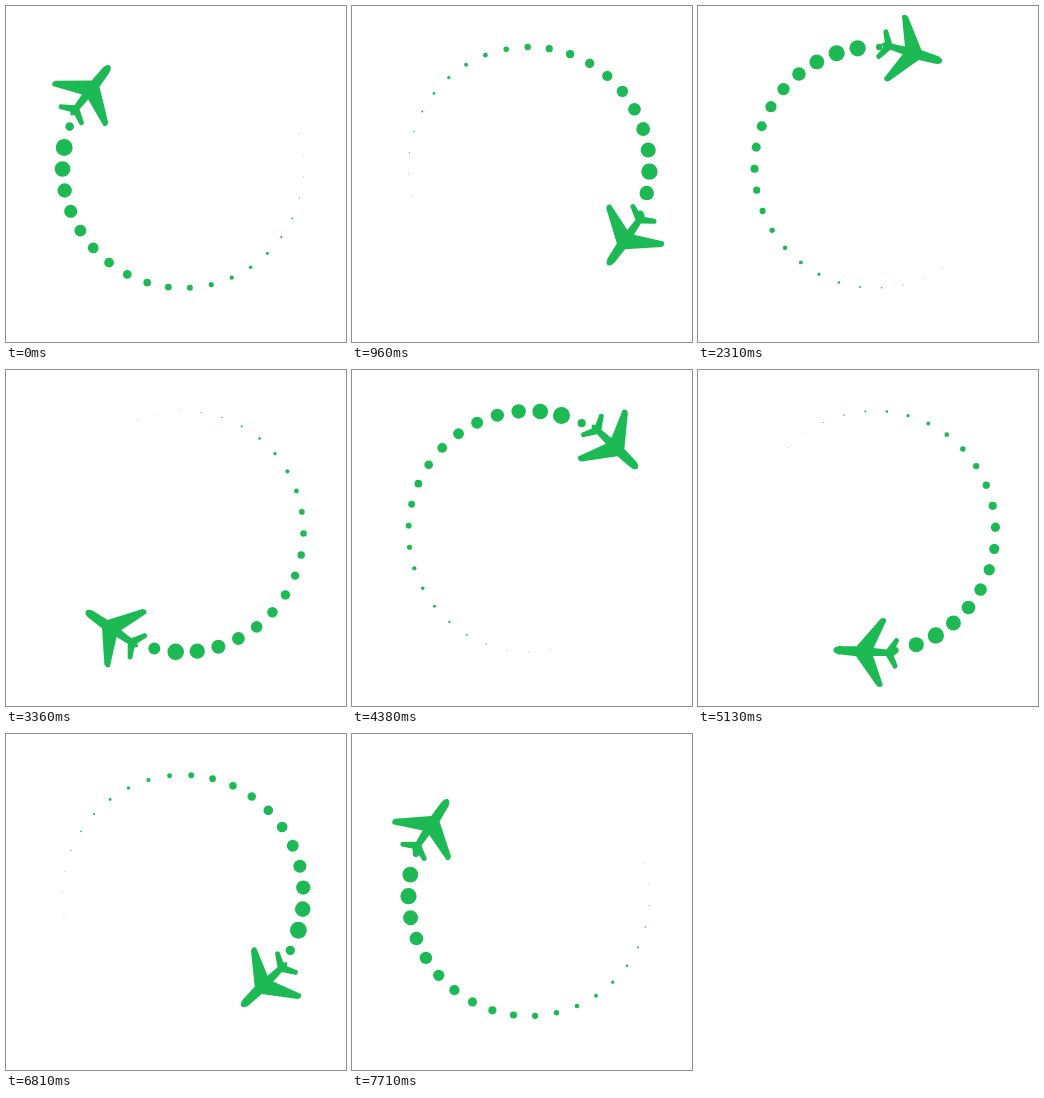
An HTML page that plays this animation: 340x336 px, repeating every 7.74 s.

```html
<!DOCTYPE html>
<html lang="en">
<head>
<meta charset="utf-8">
<title>Circling plane</title>
<style>
  html, body { margin: 0; width: 100%; height: 100%; overflow: hidden; background: #fff; }
  svg { display: block; width: 340px; height: 336px; }
</style>
</head>
<body>
<svg viewBox="0 0 340 336" fill="#1db954">
  <g transform="translate(177 161.5)">
    <g id="trail"></g>
    <path id="plane" d="M35 0 C35 -2.6 31 -4.2 27 -4.2 L12 -5 L-10.5 -33.6 Q-14.5 -36 -16.3 -32.3
      L-5 -4 L-18 -3.2 L-26.2 -15.3 Q-29.5 -16 -30 -12.6 L-25.6 -2.6 L-28.5 0
      L-25.6 2.6 L-30 12.6 Q-29.5 16 -26.2 15.3 L-18 3.2 L-5 4
      L-16.3 32.3 Q-14.5 36 -10.5 33.6 L12 5 L27 4.2 C31 4.2 35 2.6 35 0 Z"/>
  </g>
</svg>
<script>
const STEP = 30, STEPS = 258, RADIUS = 120.5;
const DOTS = 35, GAP = 360 / DOTS;
const START = 308.1;
// The ring of dots slips back ten places per loop.
const DRIFT = -10 * GAP / STEPS;
// Degrees flown by the plane at given steps; nearly constant speed.
const FLIGHT = [[0, 0], [32, 176.8], [77, 428.1], [112, 626.4], [146, 815.6],
                [197, 1100.1], [257, 1435.6], [258, 1440]];

const plane = document.getElementById('plane');
const trail = document.getElementById('trail');
const dots = Array.from({ length: DOTS }, () => {
  const dot = document.createElementNS('http://www.w3.org/2000/svg', 'circle');
  return trail.appendChild(dot);
});

const mod = (a, n) => ((a % n) + n) % n;
const smooth = x => {
  const c = Math.min(1, Math.max(0, x));
  return c * c * (3 - 2 * c);
};

function flown(step) {
  const i = FLIGHT.findIndex(key => key[0] > step);
  const [s0, a0] = FLIGHT[i - 1], [s1, a1] = FLIGHT[i];
  return a0 + (a1 - a0) * (step - s0) / (s1 - s0);
}

// Dot radius from its angle behind the plane: quick growth, long taper.
function dotRadius(lag) {
  if (lag < 11 || lag > 238) return 0;
  if (lag < 27) return 3.2 + 5.2 * smooth((lag - 15) / 11);
  return Math.max(0.45, 8.5 * ((255 - lag) / 227) ** 1.75);
}

function draw(time) {
  const step = Math.floor(time / STEP) % STEPS;
  const heading = START + flown(step);
  plane.setAttribute('transform', `rotate(${heading}) translate(0 ${-RADIUS})`);
  dots.forEach((dot, i) => {
    const angle = 1.85 + i * GAP + DRIFT * step;
    const rad = angle * Math.PI / 180;
    dot.setAttribute('cx', RADIUS * Math.sin(rad));
    dot.setAttribute('cy', -RADIUS * Math.cos(rad));
    dot.setAttribute('r', dotRadius(mod(heading - angle, 360)));
  });
}

const begin = performance.now();
function tick() {
  draw(performance.now() - begin);
  requestAnimationFrame(tick);
}
tick();
</script>
</body>
</html>
```
